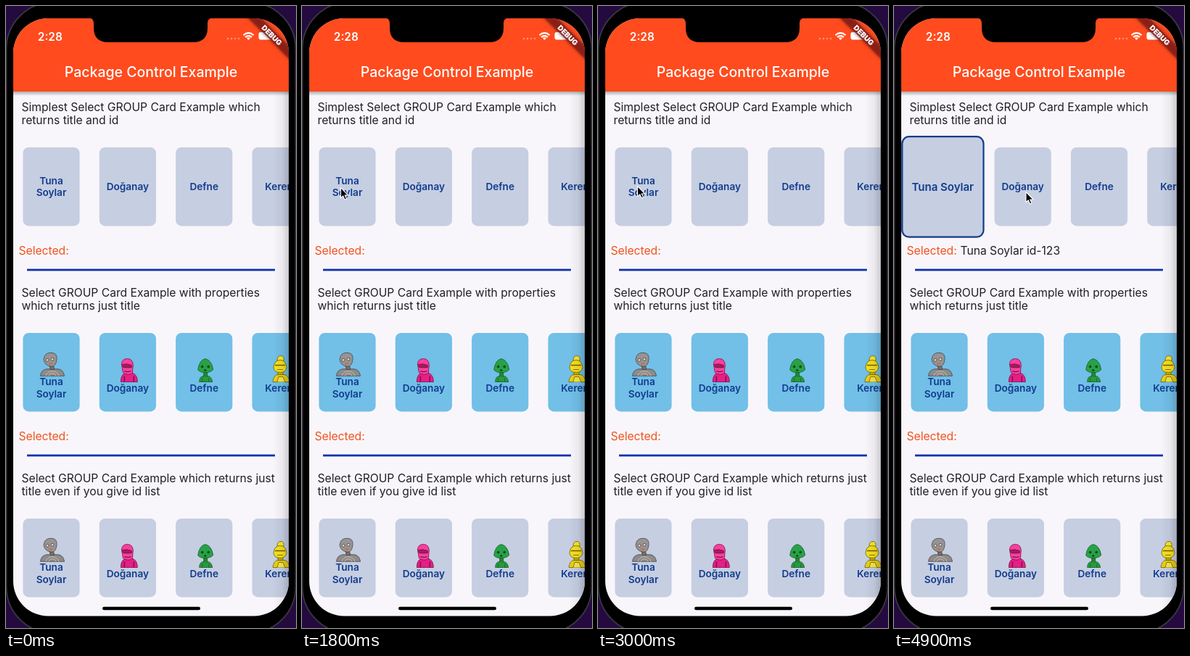
An HTML page for the animation above (5 s loop, 400 by 858 pixels).

```html
<!DOCTYPE html>
<html lang="en">
<head>
<meta charset="utf-8">
<title>Package Control Example</title>
<style>
html, body { margin: 0; width: 100%; height: 100%; overflow: hidden; background: #240a3f; }
svg { display: block; width: 100vw; height: 100vh; }
text { font-family: Inter, Roboto, sans-serif; }
.body { font-size: 15.65px; fill: #202024; }
.label { fill: #f4511e; }
.name { font-size: 13.6px; font-weight: 600; fill: #123c8c; text-anchor: middle; }
.big { font-size: 15px; }
</style>
</head>
<body>
<svg viewBox="0 0 400 858" xmlns="http://www.w3.org/2000/svg">
  <defs>
    <linearGradient id="side">
      <stop offset="0" stop-color="#000" stop-opacity="0"/>
      <stop offset=".6" stop-color="#000" stop-opacity=".05"/>
      <stop offset="1" stop-color="#000" stop-opacity=".18"/>
    </linearGradient>
    <linearGradient id="drop" x2="0" y2="1">
      <stop offset="0" stop-color="#000" stop-opacity=".3"/>
      <stop offset="1" stop-color="#000" stop-opacity="0"/>
    </linearGradient>
    <filter id="blur" x="-20%" y="-100%" width="140%" height="300%"><feGaussianBlur stdDeviation="2.5"/></filter>
    <clipPath id="screen"><rect x="10" y="17" width="380" height="824.500" rx="48"/></clipPath>

    <!-- Robots: origin at centre of the feet -->
    <g id="grey" stroke="#4b4745" stroke-width=".8">
      <path d="M-16.5 0Q-16-8-8-9.500H8Q15-9 16.5 0Z" fill="#8d8b8b"/>
      <path d="M-9 0Q-7-6.500 0-6.500T9 0M-5 0Q-4-3.500 0-3.500T5 0" fill="none" stroke="#d6c8b8"/>
      <path d="M-3-9L-4-15H1L3-9Z" fill="#77706d"/>
      <path d="M-12-23Q-11-32-2-32T6-23Q5-13-1-13Q-11-14-12-23Z" fill="#969494"/>
      <circle cx="-7" cy="-22" r="2" fill="#d9cfc9"/>
      <circle cx="0" cy="-23" r="2" fill="#d9cfc9"/>
      <path d="M-5-17H0" stroke="#d5622b" stroke-width="1.6"/>
    </g>
    <g id="pink" stroke="#7d1148" stroke-width=".8">
      <path d="M-11 0Q-11-10-5-12H6Q12-9 12 0Z" fill="#e61e87"/>
      <path d="M-6 0V-8M7 0V-8" fill="none" stroke-width="1.5"/>
      <path d="M-8-13L-10-25Q-9-32-2-32T6-24L5-12Q-1-8-8-13Z" fill="#fb3f9f"/>
      <path d="M-9-24Q-2-26 4-23V-20Q-2-19-8-20Z" fill="#a51a5e"/>
      <path d="M-6-15Q-1-13 3-15" fill="none" stroke="#5e0b36" stroke-width="1.2"/>
    </g>
    <g id="green" stroke="#175c25" stroke-width=".8">
      <path d="M-8 0Q-8-7-3-8H4Q9-7 10 0Z" fill="#269b3f"/>
      <path d="M-4 0V-5M5 0V-5M-2-7V-14H3V-7" fill="#1f8736"/>
      <path d="M-10-17Q-8-30 0-32Q9-30 11-17Q8-13 0-13T-10-17Z" fill="#28a246"/>
      <circle cx="-4" cy="-21" r="1.500" fill="#0f3818"/>
      <circle cx="4.500" cy="-21" r="1.500" fill="#0f3818"/>
      <ellipse cy="-16" rx="1.400" ry="1.200" fill="#0f3818"/>
    </g>
    <g id="yellow" stroke="#6f6104" stroke-width=".8">
      <path d="M-12 0Q-11-9-5-10H4Q10-9 11 0Z" fill="#e8d019"/>
      <path d="M-6 0L-4-7H2L5 0" fill="#f6e54c"/>
      <path d="M-5-10V-15H2V-10Z" fill="#c9b10a"/>
      <path d="M-6-29Q-6-36-1-36T3-29Z" fill="#f8e42e"/>
      <path d="M-11-20Q-10-30-2-30T7-20Q6-13-2-13T-11-20Z" fill="#f5df21"/>
      <path d="M-9-23H5" stroke-width="1.500"/>
      <path d="M-6-17H2"/>
    </g>
  </defs>

  <rect width="400" height="858" fill="#240a3f"/>
  <rect x=".5" y="-5" width="399" height="870" rx="64" fill="#000" stroke="#39363e" stroke-width="1.800"/>

  <g clip-path="url(#screen)">
    <rect x="10" y="17" width="380" height="825" fill="#f8f6fa"/>
    <g id="content"></g>
    <rect x="368" y="118" width="22" height="724" fill="url(#side)"/>
    <rect x="10" y="118" width="380" height="6" fill="url(#drop)"/>
    <rect x="10" y="17" width="380" height="101" fill="#ff4b1e"/>
    <text x="200" y="98" text-anchor="middle" font-size="19.5" font-weight="500" fill="#fff">Package Control Example</text>
    <text x="43.800" y="47.500" font-size="15.4" font-weight="600" fill="#fff">2:28</text>
    <g fill="#fff" fill-opacity=".4">
      <circle cx="306" cy="45" r="1.3"/><circle cx="311" cy="45" r="1.3"/>
      <circle cx="316" cy="45" r="1.3"/><circle cx="321" cy="45" r="1.3"/>
    </g>
    <g fill="none" stroke="#fff" stroke-width="2.2">
      <path d="M327.5 40.2Q334.5 34 341.5 40.2M330 43Q334.5 39.2 339 43"/>
      <path d="M334.5 47L332 44.3Q334.5 42.4 337 44.3Z" fill="#fff" stroke="none"/>
    </g>
    <rect x="348.500" y="36" width="21" height="10.500" rx="3" fill="#fff"/>
    <path d="M371 39.500q2 1.700 0 3.500z" fill="#fff"/>
    <g transform="translate(390 17) rotate(45)">
      <rect x="-46" y="27" width="92" height="12" fill="#000" opacity=".5" filter="url(#blur)"/>
      <rect x="-46" y="27" width="92" height="12" fill="#8c1d1b" fill-opacity=".75"/>
      <text y="36.600" text-anchor="middle" font-size="10" font-weight="900" fill="#fff">DEBUG</text>
    </g>
  </g>
  <path d="M114 16Q121 17 121 24V30Q121 50 141 50H258Q278 50 278 30V24Q278 17 285 16Z"/>
  <rect x="133" y="828.700" width="135" height="4.600" rx="2.300"/>
  <path id="cursor" d="M0 0V14.200L3.200 11.300L5.600 16.600L8 15.500L5.700 10.500H10.200Z" stroke="#fff" stroke-width="1.100" stroke-linejoin="round"/>
</svg>

<script>
const LOOP = 5000, STEP = 100, SELECT_AT = 3900;
const SECTION = 256, PITCH = 105.35, CARD_X = 23.4, CARD_W = 78.2;
const people = [["Tuna", "Soylar"], ["Doğanay"], ["Defne"], ["Kerem"]];
const robots = ["grey", "pink", "green", "yellow"];
const sections = [
  { lines: ["Simplest Select GROUP Card Example which", "returns title and id"], fill: "#c6cee2" },
  { lines: ["Select GROUP Card Example with properties", "which returns just title"], fill: "#72bfe8", art: true },
  { lines: ["Select GROUP Card Example which returns just", "title even if you give id list"], fill: "#c6cee2", art: true }
];
// time, x, y
const path = [
  [100, 300, -20], [600, 108, 196.5], [1300, 52, 253.5], [2200, 54.5, 248.5],
  [3400, 54.5, 248.5], [3800, 114.5, 272], [4700, 182, 256.5]
];

const text = (x, y, cls, s) => `<text x="${x}" y="${y}" class="${cls}">${s}</text>`;

function card(i, top, { fill, art }) {
  const x = CARD_X + i * PITCH, mid = x + CARD_W / 2, names = people[i];
  const first = top + (art ? 80.5 : 58.9) - (names.length - 1) * 8.2;
  const robot = art ? `<use href="#${robots[i]}" x="${mid + 1.5}" y="${first - 13}"/>` : "";
  return `<g><rect x="${x}" y="${top}" width="${CARD_W}" height="108.400" rx="8" fill="${fill}"/>` +
    robot + names.map((s, n) => text(mid, first + n * 16.4, "name", s)).join("") + "</g>";
}

function section(data, n) {
  const y = n * SECTION;
  let out = data.lines.map((s, i) => text(21.5, 145 + y + i * 18.4, "body", s)).join("");
  out += `<g id="row${n}">${people.map((_, i) => card(i, 195 + y, data)).join("")}</g>`;
  if (n < 2) {
    out += text(17.5, 342.7 + y, "body label", "Selected:");
    out += `<rect x="29" y="${362.6 + y}" width="342" height="2.800" fill="#1130ae"/>`;
  }
  return out;
}

const $ = id => document.getElementById(id);
$("content").innerHTML = sections.map(section).join("") +
  `<g id="chosen"><rect x="11.300" y="180.200" width="112.200" height="138.500" rx="9.500" fill="#c6cee2" stroke="#123c86" stroke-width="2.200"/>` +
  text(67.3, 254.6, "name big", people[0].join(" ")) +
  text(91.5, 342.7, "body", people[0].join(" ") + " id-123") + "</g>";

const row = [...$("row0").children];

function cursorAt(t) {
  const k = path.findIndex(p => p[0] >= t);
  if (k < 1) return path[k < 0 ? path.length - 1 : 0].slice(1);
  const [t0, x0, y0] = path[k - 1], [t1, x1, y1] = path[k];
  const u = (t - t0) / (t1 - t0), e = u * u * (3 - 2 * u);
  return [x0 + (x1 - x0) * e, y0 + (y1 - y0) * e];
}

function draw(now) {
  const t = Math.floor((now % LOOP) / STEP) * STEP;
  const on = t >= SELECT_AT;
  $("cursor").setAttribute("transform", `translate(${cursorAt(t)})`);
  $("chosen").setAttribute("visibility", on ? "visible" : "hidden");
  row.forEach((el, i) => {
    el.setAttribute("visibility", on && i === 0 ? "hidden" : "visible");
    el.setAttribute("transform", `translate(${on ? 9.8 : 0} 0)`);
  });
}

function tick() {
  draw(performance.now());
  requestAnimationFrame(tick);
}
tick();
</script>
</body>
</html>
```
